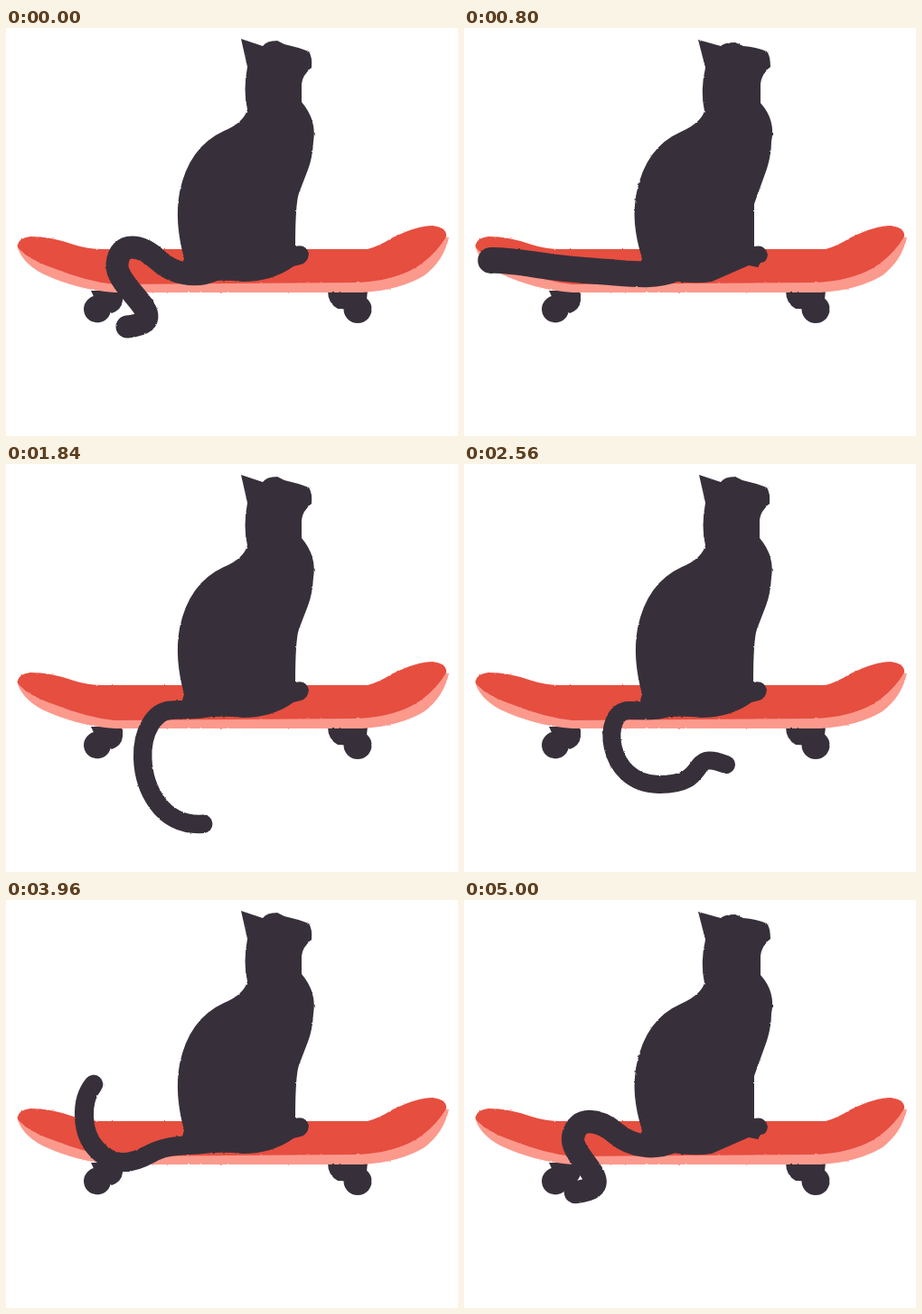
An HTML page without scripts that plays this animation: 500 px wide and 452 px high, repeating every 5.08 s.

```html
<!DOCTYPE html>
<html lang="en">
<head>
<meta charset="utf-8">
<title>Cat on a skateboard</title>
<style>
  :root { --loop: 5.08s; }
  html, body { margin: 0; width: 100%; height: 100%; overflow: hidden; background: #fff; }
  svg { display: block; width: 100vw; height: 100vh; }
  .dark { fill: #37303a; }
  .deck { fill: #e64e3f; }
  .rim { fill: #fc998d; }
  .tail {
    fill: none; stroke: #37303a; stroke-linecap: round;
    animation: swing var(--loop) linear infinite;
  }
  .body { animation: boil calc(var(--loop) / 28) step-end infinite; }

  /* The tail swings out and back through the same few poses. */
  @keyframes swing {
    /* curled over the deck */
    0%, 100% {
      stroke-width: 25px; animation-timing-function: ease-in;
      d: path("M232 267C212 277 186 274 168 257S125 235 123 262S190 325 134 331");
    }
    /* flat to the left */
    15.7%, 84.6% {
      stroke-width: 29px;
      d: path("M232 267C215 275 190 273 168 271S125 268 100 265S50 257 29 258");
    }
    /* tip raised */
    22.4%, 78% {
      stroke-width: 21px;
      d: path("M232 267C215 275 185 267 160 281S117 294 100 276S82 222 97 204");
    }
    /* falling left */
    29%, 66% {
      d: path("M232 267C215 275 190 268 165 278S138 306 112 320S58 330 50 312");
    }
    /* low left */
    32.3%, 63% {
      d: path("M232 267C215 275 195 271 178 274S148 300 143 338S84 386 75 355");
    }
    /* hanging */
    35%, 59% {
      d: path("M232 267C215 275 195 271 179 274S148 295 149 325S163 410 172 427");
    }
    /* swept right */
    36.2%, 56.7% {
      d: path("M232 267C215 275 195 271 180 273S150 295 151 326S170 402 218 399");
    }
    /* furthest right */
    48.8%, 50.8% {
      stroke-width: 20px; animation-timing-function: ease-in;
      d: path("M232 267C215 275 212 273 182 273S155 354 215 355S245 315 290 333");
    }
  }

  /* Two drawings of the body alternate. */
  @keyframes boil {
    0%, 75%, 100% {
      d: path("M260 12L284 20Q288 14 300 14L308 18Q322 21 335 26Q339 32 338 44Q328 52 327 62L327 82Q344 102 340 126Q339 144 334 157L324 183Q320 195 320 242Q332 239 335 250Q334 260 326 262L318 264Q295 281 262 281Q245 279 230 280L205 281L195 262L197 255Q186 215 192 182Q202 132 241 114Q263 105 267 90Q262 70 267 43Z");
    }
    25% {
      d: path("M259 13L284 20Q288 16 300 16L309 20Q323 21 335 26Q339 31 339 43Q329 51 328 62L328 83Q345 102 340 126Q340 140 335 156L321 195L321 242Q333 239 336 251Q335 260 328 260L325 265L315 263L274 281Q255 284 230 280L205 281L195 262L197 255Q184 215 191 182Q201 132 240 115Q262 105 266 92Q261 70 267 44Z");
    }
  }
</style>
</head>
<body>
<svg viewBox="0 0 500 452">
  <filter id="rough" filterUnits="userSpaceOnUse" x="0" y="0" width="500" height="452" color-interpolation-filters="sRGB">
    <feTurbulence type="fractalNoise" baseFrequency=".25" numOctaves="2" seed="4"/>
    <feDisplacementMap in="SourceGraphic" scale="2" xChannelSelector="R" yChannelSelector="G"/>
  </filter>
  <g filter="url(#rough)">
    <g class="dark">
      <path d="M94 291H129V302Q128 312 117 316L100 304Z"/>
      <circle cx="101" cy="311.5" r="15"/>
      <path d="M356 291H400L399 300L388 312L367 311Q356 305 356 291Z"/>
      <circle cx="389" cy="311.5" r="15.5"/>
    </g>
    <path class="rim" d="M12 240Q16 259 40 272Q78 290 120 293H395Q437 290 463 274Q484 258 490 232L470 230L400 260H100Z"/>
    <path class="deck" d="M13 243Q12 233 27 231Q50 231 75 240Q90 245 108 245H400Q412 242 428 232Q455 219 472 219Q488 221 487 231Q478 247 460 261Q432 281 385 282L120 284Q90 281 55 267Q25 257 13 243Z"/>
    <path class="tail"/>
    <path class="dark body"/>
  </g>
</svg>
</body>
</html>
```
